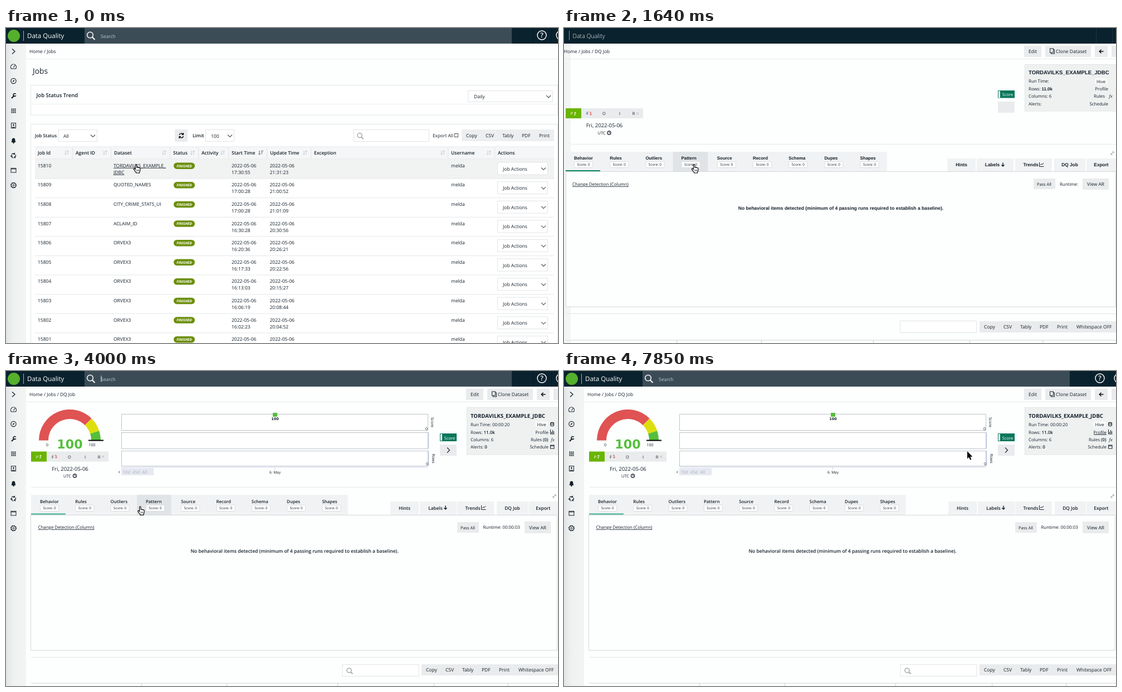
An HTML page for the animation above (8 s loop, 991x565 px).

```html
<!DOCTYPE html>
<html lang="en">
<head>
<meta charset="utf-8">
<title>Data Quality</title>
<style>
html, body { margin: 0; width: 100%; height: 100%; overflow: hidden; background: #fdfefe; }
svg { display: block; width: 991px; height: 565px; }
text { font-family: "Open Sans", "Noto Sans", sans-serif; fill: #14202a; text-rendering: geometricPrecision; white-space: pre; }
.b { font-weight: 600; }
.h { font-weight: 700; }
.early .b { font-family: "Liberation Sans", Arial, sans-serif; font-weight: 700; }
.m { text-anchor: middle; }
.e { text-anchor: end; }
.u { text-decoration: underline; }
.w { fill: #fff; }
.dj { font-family: "DejaVu Sans", sans-serif; }
.bare text, .bare .ink { display: none; }
</style>
</head>
<body>
<svg id="stage" viewBox="0 0 991 565" xmlns="http://www.w3.org/2000/svg"></svg>
<script>
const LOOP = 8000, STEP = 148.2;
const DARK = '#0a222e', INK = '#14202a', BTN = '#e9ebec', EDGE = '#d9dddf';
const SET = 'TORDAVILKS_EXAMPLE_';

// ---- drawing helpers
const text = (x, y, s, size = 8.5, cls = '', more = '') =>
  `<text x="${x}" y="${y}" font-size="${size}" class="${cls}" ${more}>${s}</text>`;
const rect = (x, y, w, h, fill, stroke = 'none', more = '') =>
  `<rect x="${x}" y="${y}" width="${w}" height="${h}" fill="${fill}" stroke="${stroke}" ${more}/>`;
const path = (d, stroke = INK, w = 1, fill = 'none', more = '') =>
  `<path class="ink" d="${d}" stroke="${stroke}" stroke-width="${w}" fill="${fill}" ${more}/>`;
const circle = (x, y, r, fill, stroke = 'none', w = 1) =>
  `<circle cx="${x}" cy="${y}" r="${r}" fill="${fill}" stroke="${stroke}" stroke-width="${w}"/>`;
const line = (d, c) => `<path d="${d}" stroke="${c}"/>`;
const hline = (x1, x2, y, c = EDGE) => line(`M${x1} ${y}H${x2}`, c);
const vline = (x, y1, y2, c = EDGE) => line(`M${x} ${y1}V${y2}`, c);
const group = (id, body, cls = '') => `<g id="${id}" class="${cls}">${body}</g>`;
const lens = (x, y, r, c, w) => circle(x, y, r, 'none', c, w) + path(`M${x + r * .7} ${y + r * .7}l${r * .9} ${r * .9}`, c, w * 1.3);
const down = (x, y) => path(`M${x - 4} ${y - 2}l4 4l4 -4`, '#4a545b', 1.1);
const select = (x, y, w, h, s, tx) =>
  rect(x + .5, y + .5, w, h, '#fff', '#e1e4e6') + text(tx, y + h / 2 + 4, s) + down(x + w - 7, y + h / 2 + 1);

function header() {
  return rect(0, 0, 991, 28, DARK) + rect(141, 0, 767, 28, '#3b4c57') +
    circle(14, 14, 11, '#55b02c') + vline(31.5, 5, 23, '#a9b4ba') +
    text(38, 18, 'Data Quality', 11.5, 'w') + lens(151, 12.5, 5.3, '#fff', 1.5) +
    text(170, 18, 'Search', 8.5, '', 'style="fill:#c3cacf"') +
    vline(946.5, 0, 28, '#061821') + vline(979.5, 0, 28, '#061821') +
    circle(962, 13, 8, 'none', '#fff', 1.4) + text(962, 17.3, '?', 12, 'w b m') + circle(996, 13, 8, 'none', '#fff', 1.4);
}

function sidebar() {
  const x = 13.5;
  const cells = [0, 1, 2].map(r => [0, 1, 2].map(c => rect(9.5 + c * 3, 144.5 + r * 3, 2, 2, INK)).join('')).join('');
  const arcs = [0, 120, 240].map(a =>
    path('M-3.5 -2A4 4 0 0 1 2 -3.5M2 -5.3V-2.6H-.5', INK, 1.1, 'none', `transform="translate(${x} 229) rotate(${a})"`)).join('');
  return rect(0, 28, 36, 537, 'url(#side)') +
    path(`M11 37.5l5 4.5l-5 4.5`, INK, 1.3) +
    path(`M9.5 73A5 5 0 1 1 17.5 73ZM${x} 71l2.5 -4`, INK, 1.1) +
    circle(x, 95, 4.6, 'none', INK, 1.2) + path(`M15.5 93l-1.2 2.8l-2.8 1.2l1.2 -2.8Z`, 'none', 0, INK) +
    path('M10 126l5 -5', INK, 2.2) + path('M17.5 118.5a2.5 2.5 0 1 0 .3 2.5', INK, 1.6) + cells +
    rect(9.5, 170.5, 8, 9, 'none', INK) + circle(x, 174, 1.4, INK) + path('M11 178h5', INK, 1.3) +
    path(`M9 205q1.6 -1 1.6 -4q0 -3.4 2.9 -3.4t2.9 3.4q0 3 1.6 4Z`, 'none', 0, INK) + circle(x, 206, 1.3, INK) + arcs +
    rect(9, 251.5, 9, 7.5, 'none', INK) + hline(9, 18, 253, INK) +
    circle(x, 282, 4.2, 'none', INK, 1.2) + circle(x, 282, 4.8, 'none', INK, 1.2).replace('/>', ' stroke-dasharray="1.9 1.87"/>') + circle(x, 282, 1.5, 'none', INK);
}

function sorter(x, on) {
  return path(`M${x - 2} 220v7M${x - 3.6} 225.4l1.6 1.8l1.6 -1.8`, on ? '#58636a' : '#c3c8cb') +
    path(on ? `M${x + 1} 220.5h4M${x + 1} 223h3M${x + 1} 225.5h2` : `M${x + 2} 227v-7M${x + .4} 221.8l1.6 -1.8l1.6 1.8`, on ? '#58636a' : '#c3c8cb');
}

function jobsPage() {
  let s = rect(0, 0, 991, 565, '#fdfefe') + text(42, 45, 'Home / Jobs', 8.4) + hline(36, 991, 55.5, '#eceeef') +
    text(48, 82, 'Jobs', 13.8) + rect(44.5, 102.5, 946, 53.5, '#fff', '#e2e5e7') + hline(45, 990, 136.5, '#eceeef') +
    text(54.5, 124, 'Job Status Trend', 9.5, 'b') + select(829, 112, 152, 20, 'Daily', 840) +
    rect(44.5, 172.5, 946, 400, '#fff', '#e2e5e7') +
    text(52, 195.5, 'Job Status', 8.1, 'b') + select(94, 182, 69, 21, 'All', 103) +
    rect(303, 182, 23, 22, BTN) + path('M311 192a3.8 3.8 0 0 1 7 -1M318.4 188v3.2h-3M318.5 194a3.8 3.8 0 0 1 -7 1M311 198v-3.2h3', '#111', 1.4) +
    text(335, 195.5, 'Limit', 8.4, 'b') + select(358, 182, 51, 21, '100', 368) +
    rect(624.5, 182.5, 135, 21, '#fff', '#e1e4e6') + lens(635, 192.5, 4, '#a7adb1', 1.6) +
    text(766, 196, 'Export All', 8.3) + rect(805.5, 189.5, 6, 6, '#fff', '#555') + rect(818, 182, 166, 21, '#eceeef');
  [['Copy', 826], ['CSV', 861], ['Tably', 891], ['PDF', 926], ['Print', 957]].forEach(([n, x]) => s += text(x, 196, n));
  s += rect(52, 213, 932, 22, '#f5f6f7') + hline(52, 984, 213, '#e6e9ea') + hline(52, 984, 235, '#dfe2e4');
  const cols = [['Job Id', 57, 109], ['Agent ID', 125, 178], ['Dataset', 194, 284], ['Status', 300, 335], ['Activity', 351, 389],
    ['Start Time', 405, 457], ['Update Time', 474, 537], ['Exception', 553, 784], ['Username', 799, 867], ['Actions', 883, 0]];
  cols.forEach(([n, x, sx], i) => {
    s += text(x, 227, n, 8.5, 'b') + (i ? vline(x - 5.5, 214, 234, '#e1e4e6') : '') + (sx ? sorter(sx, i === 5) : '');
  });
  const names = [SET, 'QUOTED_NAMES', 'CITY_CRIME_STATS_UI', 'ACLAIM_ID'];
  const start = '17:30:55 17:00:28 17:00:28 16:30:28 16:20:36 16:17:33 16:13:03 16:06:19 16:02:23 16:00:12'.split(' ');
  const end = '21:31:23 21:00:52 21:01:09 20:30:56 20:26:21 20:22:56 20:15:27 20:08:44 20:04:52 20:02:10'.split(' ');
  start.forEach((from, i) => {
    const y = 235.5 + i * 34.6, b = y + 14.3;
    if (!i) s += rect(52, y, 932, 34.6, '#f1f2f2');
    s += hline(52, 984, y + 34.6, '#e4e7e8') + text(57, b, 15810 - i) +
      text(193, b, names[i] || 'ORVEX3', 8.5, i ? '' : 'u') + (i ? '' : text(193, b + 12, 'JDBC', 8.5, 'u')) +
      rect(301, y + 6, 38, 11.5, '#6c8f0c', 'none', 'rx="5.7"') +
      text(320, y + 14.1, 'FINISHED', 6.3, 'w m h', 'font-style="italic"') +
      text(405, b, '2022-05-06') + text(405, b + 12, from) + text(473.5, b, '2022-05-06') + text(473.5, b + 12, end[i]) +
      text(799, b, 'melda') + select(882, y + 5, 90, 22, 'Job Actions', 892);
  });
  return s + header() + sidebar();
}

const TABS = ['Behavior', 'Rules', 'Outliers', 'Pattern', 'Source', 'Record', 'Schema', 'Dupes', 'Shapes'];

// The job page in its unstyled (early) or finished layout
function jobPage(early) {
  const x = early ? 3 : 45, d = early ? 0 : 1, step = early ? 64.2 : 63.3, mid = early ? 72.5 : 115;
  let s = rect(0, 0, 991, 565, '#fdfefe');
  if (early) s += rect(0, 28, 12, 537, '#f3f4f4');
  s += text(early ? 0 : 42, 45, 'Home / Jobs / DQ Job', 8.4) + hline(early ? 0 : 36, 991, 55.5, '#e8eaeb') +
    rect(826, 32, 31, 20, BTN) + text(841.5, 45, 'Edit', 8.5, 'm') + rect(864, 32, 82, 20, BTN) + text(883, 45, 'Clone Dataset') +
    rect(874.5, 39, 6, 7, '#fff', INK) + rect(872.5, 37, 6, 7, BTN, INK) +
    rect(953, 32, 23, 20, BTN) + path('M968.5 42h-7M964.5 38.7l-3.3 3.3l3.3 3.3', '#111', 1.5) + rect(983, 32, 8, 20, BTN);
  // summary card
  s += rect(827.5, 65.5, 164, 83.5 + d, '#eff1f1', '#e2e5e6') + text(834, 83 + d, SET + 'JDBC', 9.6, 'b h') +
    text(834, 98 + d / 2, 'Run Time:' + (early ? '' : ' 00:00:20'), 7.9) +
    text(834, 112 + d / 2, 'Rows: <tspan class="b">11.0k</tspan>', 7.9) + text(834, 125 + d, 'Columns: 6', 7.9) +
    text(834, 138.5 + d / 2, 'Alerts:' + (early ? '' : ' <tspan class="b">0</tspan>'), 7.9) +
    rect(early ? 952 : 949, 90, 24, 11, '#f8f9f9', 'none', 'rx="5"') + text(early ? 964 : 961.5, 98.5, 'Hive', 7.9, 'm') +
    text(early ? 977 : 974, 112 + d / 2, 'Profile', 7.9, 'e') +
    text(early ? 971 : 973.5, 125 + d, early ? 'Rules' : 'Rules <tspan class="b">(0)</tspan>', 7.9, 'e') +
    text(981.5, 125 + d, 'fx', 7.5, 'm', 'font-style="italic"') + text(early ? 977 : 974, 139, 'Schedule', 7.9, 'e');
  if (!early) s += path('M977.5 93v5q3 2 6 0v-5q-3 -2 -6 0q3 2 6 0M977.5 95.5q3 2 6 0') +
    path('M977.5 105v8h7M979.5 112v-3M981.5 112v-6M983.5 112v-4') + rect(977.5, 133, 6.5, 6, 'none', INK) + hline(977, 984, 134.3, INK);
  // score and run buttons
  s += rect(779, 112, 30, 13.5 + d / 2, '#08765a') + rect(780, 113, 3, 12, '#fff') + text(796.5, 122 + d / 2, 'Score', 7.5, 'w m') +
    rect(779, 132, 30, 20, BTN) + (early ? '' : path('M792 137.5l4.5 4.5l-4.5 4.5', INK, 1.1));
  s += rect(x, 144 + d / 2, 139, 18, BTN) + rect(x, 144 + d / 2, 28, 18, '#69b500');
  [...'PFOIR'].forEach((c, i) => s += text([11, 39, 69, 97, 122][i] + x, 156 + d / 2, c, 7.4, i ? 'm' : 'm w'));
  s += path(`M${x + 15} 156h2v-5m-1.6 1.5l1.6 -1.7l1.6 1.7`, '#fff') + path(`M${x + 43} 151h2v5m-1.6 -1.5l1.6 1.7l1.6 -1.7`, '#d8474a') +
    path(`M${x + 127} 151.5l4 4m0 -4l-4 4`, '#b5babd') +
    text(mid, 178 + d / 2, 'Fri, 2022-05-06', 9.5, 'm') + text(mid - 12, 190.5 + d / 2, 'UTC', 7.4) +
    circle(mid + 8.5, 188, 3.1, 'none', INK, 1.2) + path(`M${mid + 8.5} 186v2h1.6`, INK, .9);
  // tabs
  s += hline(early ? 12 : 45, 991, 208.5, '#e6e8e9') + path('M982 227l5 -5m-2.6 0h2.6v2.6m-5 -.2v2.6h2.6', '#8d969b', .9);
  s += rect(x, 222, step * 9 - 1, 35 + d, '#f1f2f3');
  TABS.forEach((name, i) => {
    const tx = x + i * step, lx = tx + (early ? 15 : 16);
    s += rect(tx, 222, step - 1.5, 35 + d, early && i === 3 ? '#e1e4e6' : '#f1f2f3', 'none', early ? '' : `id="tab${i}"`) +
      text(lx, 235.5 + d, name, 7.9, 'b') + rect(lx + .5, 239.5 + d, 33, 11, '#fff', '#d9dcde', 'rx="1"') + text(lx + 17, 247 + d, 'Score: 0', 6.3, 'm');
  });
  const o = early ? 0 : 2;
  [['Hints', 688 + o, 51], ['Labels', 741 + o, 66], ['Trends', 810, 66], ['DQ Job', 880 + d, 56], ['Export', 938, 53]].forEach(([n, bx, w], i) => {
    const icon = i === 1 || i === 2;
    s += rect(bx, 234, w, 23 + d, '#f1f2f3') + text(bx + w / 2 - (icon ? 5 : 0), 247.5 + d, n, 8.3, 'b m');
  });
  s += path(`M${788 + d} 241.5v6.5m-2.6 -2.6l2.6 2.7l2.6 -2.7`, INK, 1.4) + path('M853.5 241v7.5h8M855 246l2 -2.2l1.6 1.3l2.4 -3', INK);
  s += rect(x + .5 - d, 257.5 + d, 991 - x - 1, 242.5, '#fdfefe', '#d3d8da') + rect(x, 255 + d / 2, 62, 2, early ? '#0a8a62' : '#3ab096');
  s += text(early ? 15 : 57.5, 283, 'Change Detection (Column)', 7.9, 'u') +
    rect(early ? 843 : 810, 270 + d, 39, 19, BTN) + text(early ? 862 : 829, 282.5 + d, 'Pass All', 7.4, 'm') +
    text(early ? 890 : 856.5, 282.5, 'Runtime:' + (early ? '' : ' 00:00:03'), 7.85) +
    rect(931, 270, 47, 20 + d, BTN) + text(954.5, 283 + d / 2, 'View AR', 8.4, 'm') +
    text(early ? 497 : 518, 325.5 + d / 2, 'No behavioral items detected (minimum of 4 passing runs required to establish a baseline).', 8.5, 'b m');
  // bottom table
  s += hline(early ? 3 : 45, 991, 512.5 + d, '#e3e6e7') + rect(603.5 + d / 2, 525.5 + d, 137, 21, '#fff', '#e1e4e6') + rect(746, 526, 245, 20, BTN) +
    (early ? '' : lens(616, 537, 4, '#a7adb1', 1.6));
  [['Copy', 754], ['CSV', 789], ['Tably', 819], ['PDF', 854], ['Print', 885], ['Whitespace OFF', 920]].forEach(([n, bx]) => s += text(bx, 539, n));
  s += hline(x, 991, 560, '#d0d4d7');
  (early ? [202, 354, 555, 728, 859] : [243, 396, 595, 768, 901]).forEach(cx => s += vline(cx + .5, 560, 565, '#cdd2d5'));
  if (early) return s + rect(0, 0, 991, 28, DARK) + vline(9.5, 5, 22, '#8b989f') + vline(955.5, 0, 28, '#1c3441') + vline(984.5, 0, 28, '#1c3441') +
    text(15.5, 18, 'Data Quality', 10.6, 'w', 'font-weight="300"');
  return s + gauge() + group('chart', chart()) +
    group('caret', vline(171, 8.5, 19.5, '#e8ecee')) + group('line', hline(951, 974, 114, INK));
}

function gauge() {
  const at = (r, a) => `${114.5 + r * Math.cos(a * Math.PI / 180)} ${124.5 - r * Math.sin(a * Math.PI / 180)}`;
  const band = (a, b, c) => path(`M${at(55.5, a)}A55.5 55.5 0 0 1 ${at(55.5, b)}L${at(38.5, b)}A38.5 38.5 0 0 0 ${at(38.5, a)}Z`, 'none', 0, c);
  return band(180, 45, '#df5353') + band(45, 18, '#dddf0d') + band(18, 0, '#55bf3b') +
    path('M148 124.5H175', '#000', 2, 'none', 'id="needle"') +
    text(114.5, 138.5, '100', 22.2, 'dj m h', 'style="fill:#55bf3b"') +
    text(74, 134.5, '0', 7, 'm') + text(154.5, 134.5, '100', 7, 'm');
}

function chart() {
  const box = (y, h) => rect(207.5, y, 550, h, '#fff', '#bfc4c8');
  return box(77.5, 29) + box(110.5, 29) + box(143.5, 27) +
    path('M758.5 110V139M758.5 143V170', '#c5cfe6', 1.6) +
    rect(479, 75, 8, 7, '#55bf3b') + text(483, 88, '100', 6.4, 'dj m h') +
    text(755, 105.5, '0', 7, 'm') + text(756, 168.5, '0', 7, 'm') +
    text(0, 0, 'Score', 7, 'm', 'transform="translate(763 92) rotate(90)"') +
    text(0, 0, 'Rows', 7, 'm', 'transform="translate(764.5 157) rotate(90)"') +
    hline(207, 757, 172.5, '#ccd6eb') + vline(482.5, 172, 177, '#ccd6eb') +
    rect(207, 174, 58, 13, '#e6e9f1') + text(209.5, 184, '10d  45d  All', 7.6, 'b', 'style="fill:#b9bec8"') +
    path('M204 179.5l-1.4 1.8l1.4 1.8', INK, .9) + text(483, 183.5, '6. May', 6.6, 'm');
}

const blank = rect(0, 0, 991, 565, '#fdfefe') + rect(0, 0, 12, 565, '#f4f4f4', 'none', 'rx="3"') + rect(0, 0, 5, 565, '#eeefef') +
  hline(0, 991, 27.5, '#eceeee') + [[832, 31], [870, 78], [955, 23], [985, 6]].map(([x, w]) => rect(x, 3, w, 21, '#ebeced')).join('');
const arrow = path('M0 0V13.2L3 10.5L5.2 15.5L7.4 14.5L5.2 9.7H9.3Z', '#fff', 1, '#000', 'paint-order="stroke"');
const hand = path('M-1.2 9.5V2Q-1.2 .6 0 .6T1.2 2V6Q2.6 5 3.6 6.4Q5 5.6 5.8 7Q7.4 6.6 7.4 8.4V11Q7.4 13 6 14.6V16H0V14.6Q-2 13 -4 9.6Q-4.4 8 -3 8Q-2 8.2 -1.2 9.5Z', '#000', 1.1, '#fff') +
  path('M1.4 10v3M3.4 10v3M5.2 10v3', '#000', .7);

const stage = document.getElementById('stage');
stage.innerHTML = '<defs><linearGradient id="side"><stop offset="0" stop-color="#e1e4e5"/><stop offset=".35" stop-color="#eff1f1"/><stop offset="1" stop-color="#f3f4f4"/></linearGradient></defs>' +
  group('jobs', jobsPage()) + group('blank', blank) + group('early', jobPage(true), 'early') +
  group('main', jobPage(false) + header() + sidebar()) + group('arrow', arrow) + group('hand', hand);

// ---- motion
const el = id => document.getElementById(id);
const show = (id, on) => { el(id).style.display = on ? '' : 'none'; };
const ease = p => (1 - Math.cos(Math.PI * Math.min(1, Math.max(0, p)))) / 2;
const moves = [[0, 233.5, 244], [3930, 233.5, 244], [5030, 943, 85], [5440, 943, 85], [5980, 973, 140], [6510, 962, 107], [7290, 962, 107], [7850, 724, 144]];
const blinks = [2080, 2530, 2970, 3410, 4000, 4450, 5040, 5490, 5930, 6520, 6970, 7110];
el('main').append(el('caret'));

function pointer(t) {
  let i = moves.length - 1;
  while (moves[i][0] > t) i--;
  const [t0, x0, y0] = moves[i], [t1, x1, y1] = moves[i + 1] || [t0 + 1, x0, y0], p = ease((t - t0) / (t1 - t0));
  return [x0 + (x1 - x0) * p, y0 + (y1 - y0) * p];
}

function draw(t) {
  const q = Math.floor((t + 10) / STEP) * STEP;
  const main = t >= 1790, [x, y] = pointer(q);
  show('jobs', t < 450);
  show('blank', t >= 450 && t < 590);
  show('early', t >= 590 && !main);
  el('early').classList.toggle('bare', t < 1490);
  show('main', main);
  show('chart', t >= 2080);
  show('caret', blinks.filter(b => b <= t).length % 2 === 1);
  show('line', t >= 6370);
  el('needle').setAttribute('transform', `rotate(${-180 * (1 - ease((q - 2212) / 1000))} 114.5 124.5)`);

  const over = main && y > 222 && y < 258 ? Math.floor((x - 45) / 63.3) : -1;
  TABS.forEach((_, i) => el('tab' + i).setAttribute('fill', i === over ? '#e1e4e6' : '#f1f2f3'));
  const pointing = t < 450 || (t >= 1490 && !main) || over >= 0 && over < 9 || (t >= 6370 && t < 7410);
  show('hand', pointing);
  show('arrow', !pointing);
  [el('hand'), el('arrow')].forEach(c => c.setAttribute('transform', `translate(${x} ${y})`));
}

const begin = performance.now();
function tick() {
  draw((performance.now() - begin) % LOOP);
  requestAnimationFrame(tick);
}
tick();
</script>
</body>
</html>
```
